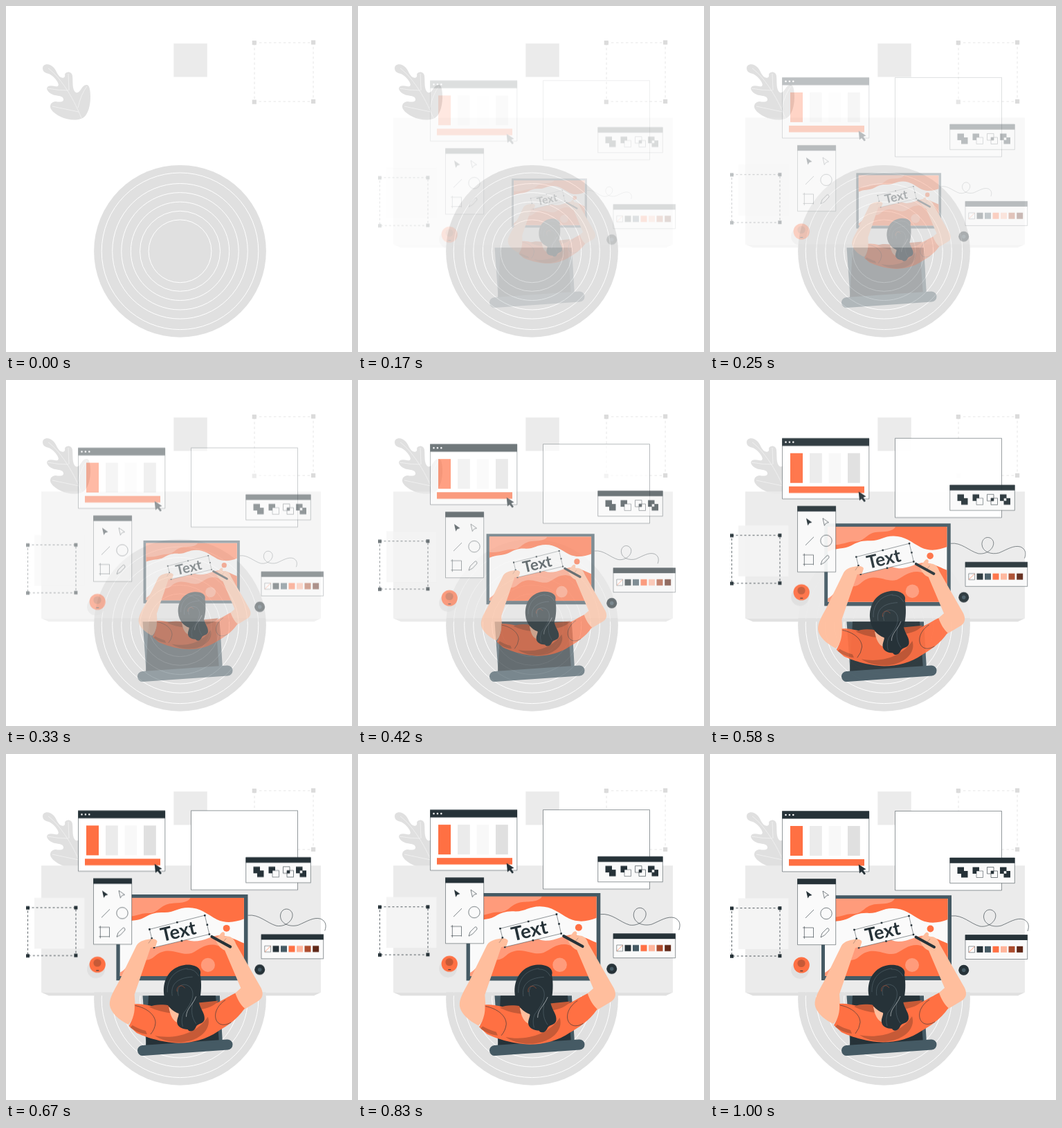
Animation of 500 by 500 pixels, one loop 1.04 s. Source, as an HTML page:

```html
<!DOCTYPE html>
<html lang="en">
<head>
<meta charset="utf-8">
<title>Designer at work</title>
<style>
  html, body { margin: 0; width: 100%; height: 100%; overflow: hidden; background: #fff; }
  svg { display: block; width: 100%; height: 100%; }

  .fade, .rise, .zoom {
    animation: 1s cubic-bezier(.36, -.01, .5, 1.38) calc(var(--t, 0) * -1ms) both paused;
  }
  .fade { animation-name: fade; }
  .rise { animation-name: rise; }
  .zoom { animation-name: zoom; transform-origin: 306px 311px; }
  @keyframes fade { from { opacity: 0; } to { opacity: 1; } }
  @keyframes rise { from { opacity: 0; transform: translateY(30px); } to { opacity: 1; transform: none; } }
  @keyframes zoom { from { opacity: 0; transform: scale(.5); } to { opacity: 1; transform: none; } }

  .dark { fill: #263238; }
  .slate { fill: #455a64; }
  .orange { fill: #ff7043; }
  .salmon { fill: #ff9b7b; }
  .rust { fill: #c65a37; }
  .skin { fill: #ffbe9d; }
  .gray { fill: #e0e0e0; }
  .pale { fill: #ebebeb; }
  .line { fill: none; stroke: #263238; stroke-width: .6; }
  .page { fill: #fff; stroke: #263238; stroke-width: .5; }
  .panel { fill: #fafafa; stroke: #263238; stroke-width: .5; }
  .rings { fill: none; stroke: #fff; stroke-width: 1; }
  .hair { fill: none; stroke: #60727b; stroke-width: .5; }
  .word { font: 700 27px Lato, "Open Sans", sans-serif; text-anchor: middle; }
</style>
</head>
<body>
<svg viewBox="0 0 500 500">
  <!-- still backdrop -->
  <circle class="gray" cx="251.5" cy="354.3" r="124.4"/>
  <g class="rings">
    <circle cx="251.5" cy="354.3" r="113.3"/>
    <circle cx="251.5" cy="354.3" r="97.8"/>
    <circle cx="251.5" cy="354.3" r="84.7"/>
    <circle cx="251.5" cy="354.3" r="71.2"/>
    <circle cx="251.5" cy="354.3" r="58"/>
    <circle cx="251.5" cy="354.3" r="45.4"/>
  </g>
  <path class="gray" d="M53 90C53 83 63 82 69 89C73 93 74 100 79 103C83 105 86 103 85 99C86 94 95 94 96 101C97 109 95 121 101 125C108 127 109 113 117 114C121 114 122 124 122 131C122 147 117 161 108 163C94 168 72 160 65 149C62 143 66 138 72 138C78 139 83 139 83 135C83 130 76 130 71 129C65 128 59 123 59 119C60 114 66 115 71 116C75 117 77 115 75 111C73 106 67 100 62 98C57 97 53 95 53 90Z"/>
  <path d="M61 90C76 101 95 127 109 162M60 119Q75 122 90 122M67 145L105 153M90 98L91 122M117 116Q108 128 104 147" fill="none" stroke="#f5f5f5" stroke-width=".7"/>
  <path class="pale" d="M242.300 54.200h48.500v48.300h-48.500z"/>
  <path d="M359 53H444V138H359Z" fill="none" stroke="#e6e6e6" stroke-dasharray="3.500 3.500"/>
  <path fill="#dbdbdb" d="M355.700 50h6.200v6.200h-6.200zM441 49.500h6.200v6.200h-6.200zM441 134.800h6.200v6.200h-6.200zM355.700 135.600h6.200v6.200h-6.200z"/>

  <g class="fade">
    <path class="pale" d="M51 161.300H455V344.500H51Z"/>
    <path class="gray" d="M51 344.500H455L445 349.300H62Z"/>
  </g>

  <g class="fade">
    <path class="slate" d="M197.500 349.300H309L313 418L203 427Z"/>
    <path class="dark" d="M206 349.300H303L308 418L202 424Z"/>
    <path d="M197.500 428.500L320 420" stroke="#455a64" stroke-width="15" stroke-linecap="round"/>
  </g>

  <g class="zoom">
    <path class="line" d="M349 234C365 232 376 245 390 249C404 251 415 240 412.500 231C409 222 396 223 395.500 235C396 247 410 251 421 248C433 243 443 236 453 239C460 242 462 248 459 256"/>
    <path class="slate" d="M161 204.200H349V327H161Z"/>
    <svg x="166" y="209" width="177.500" height="112" viewBox="166 209 177.500 112">
      <path fill="#fafafa" d="M166 209h178v112h-178z"/>
      <path class="orange" d="M166 209H344V239C331 244 318 246 305 240C290 232 281 223 264 223C249 223 244 230 230 230C217 229 210 232 201 237C190 243 178 240 166 246Z"/>
      <path class="salmon" d="M166 209H267C263 217 250 216 240 217C224 218 221 231 208 231C195 230 187 238 166 236Z"/>
      <path class="salmon" d="M166 316C180 309 183 290 196 286C214 281 218 266 234 263C249 261 258 270 272 271C290 271 300 260 315 263C328 267 334 282 344 281V321H166Z"/>
      <path class="orange" d="M170 321C185 314 188 299 203 298C217 297 215 288 231 285C246 283 256 292 269 288C280 283 285 276 299 276C315 277 325 292 344 290V321Z"/>
      <path class="orange" d="M304 270C312 256 333 270 344 274V292H314Z"/>
      <circle class="salmon" cx="292" cy="305" r="10"/>
      <circle class="orange" cx="318.500" cy="252.500" r="4.900"/>
    </svg>

    <path class="panel" d="M208.500 254L287.500 234L294 261L215 280Z"/>
    <path d="M208.500 254h.01M248 244h.01M287.500 234h.01M291 247.500h.01M294 261h.01M254.500 270.500h.01M215 280h.01M211.700 267h.01" stroke="#263238" stroke-width="2.500" stroke-linecap="square"/>
    <text class="dark word" transform="translate(251.500 266) rotate(-13)">Text</text>

    <path class="skin" d="M190 277C194 270 205 268 211 268C216 267 221 270 219 273L217 279L210 280L187 347L188 362C188 375 184 385 178 390C164 383 153 373 151.500 362C151 352 158 341 164 330Z"/>
    <path class="skin" d="M303 269L311 259C314 256 318 259 315 264C322 263 329 265 332 275L368 338C372 347 370 353 363 357L343 369C334 363 330 352 331 345L339 338L316 284C309 281 305 275 303 269Z"/>
    <path d="M297.500 264.500L324 279" stroke="#263238" stroke-width="4" stroke-linecap="round"/>
    <path class="line" d="M211 268L207 274M318 267L313 273" opacity=".5"/>

    <path class="orange" d="M187 361C200 359 218 366 238 369L290 363C306 361 320 350 331 345C334 354 339 362 344.500 367C333 384 318 393 306 400C290 411 270 416.500 250 416.500C225 416 200 407 190 402L179 392C185 382 188 372 187 361Z"/>
    <path class="rust" d="M208 365C216 361 227 361 238 363L242 374C229 373 218 370 208 365ZM278 359L307 356C302 363 292 367 279 369Z"/>
    <path class="rust" d="M216 406C240 411 274 406 292 379C298 398 278 413 258 415C242 417 226 413 216 406ZM184 391C189 394 196 397 203 399L205 404C195 403 187 399 181 394Z"/>
    <path class="line" d="M188 363C204 366 217 376 217 388Q216 397 210 404M317 355C303 364 299 379 306 387C311 392 318 391 325 387"/>

    <path class="skin" d="M236 365L253 370L250 388C242 386 238 377 236 365Z"/>
    <path class="dark" d="M229 346C227 325 238 308 258 305C273 303 284 310 281 319C283 330 283 346 279 358C282 370 288 374 287 383C285 390 278 388 275 393C272 401 265 401 263 397C256 397 249 394 248 388C247 382 251 377 250 374C240 371 230 360 229 346Z"/>
    <path class="hair" d="M234 344C233 327 243 312 263 310M241 349C238 333 248 323 270 322M250 349C246 337 255 328 266 336C276 346 267 362 257 374Q253 383 256 393M270 358C269 369 267 377 275 389M262 311Q273 310 279 321"/>
    <path d="M248 343C246 336 254 331 259 338" fill="none" stroke="#a84e34" stroke-width=".7"/>
    <path d="M275 350C270 363 261 367 261 379" fill="none" stroke="#dce1e3" stroke-width=".6"/>
  </g>

  <g class="rise">
    <path class="page" d="M104.500 82.700H229.800V170H104.500Z"/>
    <path class="dark" d="M104.200 82.500H230V93.500H104.200Z"/>
    <path d="M109.500 88h.01M114.900 88h.01M120.300 88h.01" stroke="#fff" stroke-width="2.600" stroke-linecap="round"/>
    <path class="orange" d="M116 104h18v43h-18zM114 152h109v9.500h-109z"/>
    <path class="pale" d="M144 104h17.800v43h-17.800z"/>
    <path fill="#f8f8f8" d="M171.500 104h17.500v43h-17.500z"/>
    <path class="gray" d="M199 104h17.800v43h-17.800z"/>
    <path class="dark" d="M214.700 159.500L216 172.500L219 169.700L222.800 174.500L225 173L221.500 168L225.500 166.500Z"/>
  </g>

  <path class="rise page" d="M267.500 82.500H421.500V197H267.500Z"/>

  <g class="rise">
    <path class="panel" d="M346.700 150H440.300V186.700H346.700Z"/>
    <path class="dark" d="M346.500 150h94v7.700h-94z"/>
    <path class="dark" d="M357.500 163.500h9.500v9.500h-9.500zM363 169h9.500v9.500h-9.500zM379.500 163.500h9.500v9.500h-9.500zM406 169h4v4h-4zM419 163.500h9.500v9.500h-9.500zM424.500 169h9.500v9.500h-9.500z"/>
    <path class="panel" d="M385 169h9.500v9.500h-9.500zM424.500 169h4v4h-4z"/>
    <path class="line" d="M400.500 163.500h9.500v9.500h-9.500zM406 169h9.500v9.500h-9.500z"/>
  </g>

  <g class="rise">
    <path fill="#f4f4f4" d="M41 208.500h72.500v73.500h-72.500z"/>
    <path class="line" d="M31.500 222.700H101V292H31.500Z" stroke-dasharray="3 3" style="stroke-width:.8"/>
    <path class="dark" d="M29 220.400h5v5h-5zM98.400 220.200h5v5h-5zM98.400 289.200h5v5h-5zM29 289.700h5v5h-5z"/>
  </g>

  <g class="rise">
    <path class="panel" d="M126.500 180.500H181.700V275.700H126.500Z"/>
    <path class="dark" d="M126.200 180.500h55.700v7.800h-55.700z"/>
    <path class="dark" d="M139 198L141.300 208.500L143.500 205.300L147.500 204Z"/>
    <path class="line" d="M163 198L165.300 208.500L167.500 205.300L171.500 204ZM138 237L150 225M134 251H149.500V265.500M136.300 249V267M134.500 264.500H149.500M160 265L162 259L169 252Q172 251 172 255L165.500 262Z"/>
    <circle class="line" cx="168" cy="230.500" r="8.200"/>
  </g>

  <g class="rise">
    <path class="panel" d="M369 261.500H458.700V296.500H369Z"/>
    <path class="dark" d="M368.800 261.300h90v7.700h-90z"/>
    <path class="page" d="M373.800 278h8.800v8.800h-8.800z"/>
    <path d="M374 286.500L382.500 278.200" stroke="#ff7043" stroke-width=".7"/>
    <path class="dark" d="M385.500 277.800h9v9h-9z"/>
    <path class="slate" d="M397 277.800h9v9h-9z"/>
    <path class="orange" d="M408.500 277.800h9v9h-9z"/>
    <path fill="#ffb59b" d="M420 277.800h9v9h-9z"/>
    <path fill="#ac4b2c" d="M431.500 277.800h9v9h-9z"/>
    <path fill="#5f2717" d="M443.200 277.800h9v9h-9z"/>
  </g>

  <g class="rise">
    <circle class="gray" cx="130" cy="312" r="12.800"/>
    <circle class="orange" cx="132.200" cy="305" r="11.600"/>
    <circle class="rust" cx="132" cy="302.500" r="5.600"/>
    <path d="M130.300 313.500h4" stroke="#263238" stroke-width="1"/>
  </g>

  <g class="rise">
    <circle class="dark" cx="366.700" cy="312.300" r="7.500"/>
    <circle class="slate" cx="366.700" cy="312.300" r="2.800"/>
  </g>
</svg>
<script>
  const LOOP = 1040, STEP = LOOP / 25;
  const root = document.documentElement;
  const start = performance.now();

  // The entrance advances in 24 fps steps after a short empty hold.
  function tick() {
    const time = (performance.now() - start) % LOOP;
    const step = Math.floor((time + 4) / STEP);
    const clock = step < 2 ? 0 : Math.min(1000, (step + 1) * 1000 / 24);
    root.style.setProperty("--t", clock);
    requestAnimationFrame(tick);
  }
  tick();
</script>
</body>
</html>
```
